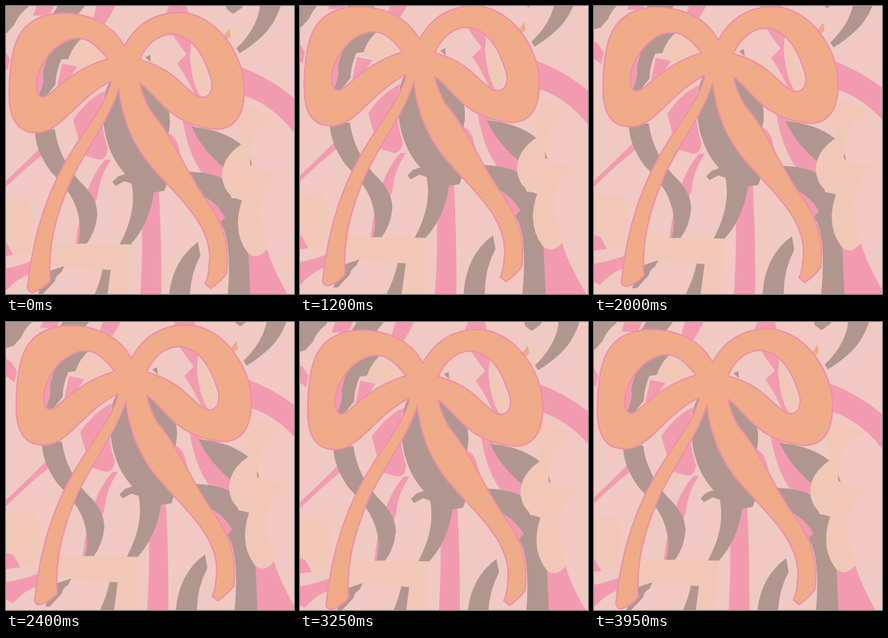
Recreate the animation shown at these times as an HTML page with a canvas. Size 360 px wide and 360 px high, loop 4 s.

```html
<!DOCTYPE html>
<html lang="en">
<head>
<meta charset="utf-8">
<title>Drifting bow</title>
<style>
  html, body { margin: 0; width: 100%; height: 100%; overflow: hidden; background: #f0c9c2; }
  canvas { display: block; width: 360px; height: 360px; }
</style>
</head>
<body>
<canvas id="stage" width="360" height="360"></canvas>
<script>
const ctx = document.getElementById('stage').getContext('2d');
const LOOP = 4000, STEP = 50, RADIUS = 5.2;
const BASE = '#f0c9c2', PINK = '#f29bb0', DARK = '#b19690', PEACH = '#f1c8b8',
      ORANGE = '#efab88', EDGE = '#f08ea8';

const shape = (color, ...paths) => ({ color, path: new Path2D(paths.join(' ')) });

const ribbons = [
  shape(PEACH, 'M84 40 L130 62 L100 82 L76 66Z'),
  shape(PINK,
    // top edge
    'M34 12 L42 -12 H66 L54 12Z',
    'M108 18 L117 -12 H141 Q134 8 124 22Z',
    'M200 10 L208 -12 H224 L229 16Z',
    'M-12 48 L-2 55 L5 66 L2 80 L-12 70Z',
    // inside the loops
    'M36 110 Q34 82 46 66 L56 62 L50 112Z',
    'M70 72 L89 76 L78 92 L64 100Z',
    'M204 28 L232 34 L230 62 Q230 84 246 116 L236 112 Q228 92 214 72 L226 60 Q214 46 204 28Z',
    // right band
    'M290 75 Q338 92 374 128 V178 Q338 121 290 110Z',
    // centre left
    'M84 142 Q102 116 124 106 Q114 138 127 178 Q126 192 116 192 L96 186Z',
    'M131 192 Q116 214 114 240 Q102 265 96 298 H87 Q95 224 124 192Z',
    'M-12 230 Q20 200 42 178 L47 185 Q20 206 -8 234Z',
    // centre right
    'M198 158 Q213 159 217 182 L224 206 L200 180Z',
    'M221 144 L236 150 Q243 179 273 200 L272 216 L246 210 Q228 186 221 144Z',
    'M248 236 L262 240 L277 266 L270 280Z',
    // bottom
    'M184 228 L191 230 Q195 300 194 374 H167 Q172 300 169 262Z',
    'M-12 292 L1 296 L9 311 L-12 314Z',
    'M-12 330 Q12 327 34 318 L32 334 Q14 340 0 356 L-12 350Z',
    'M303 304 L325 299 Q332 328 360 374 H304Z'),
  shape(DARK,
    // top edge
    'M-12 -12 H34 L27 2 Q16 10 10 24 L1 34 L-12 38Z',
    'M53 14 Q65 6 68 -12 H105 Q96 6 85 15Z',
    'M271 -12 H303 L295 2 L284 10 L276 4Z',
    'M318 -12 H347 Q339 20 321 37 Q306 51 292 59 L288 53 Q312 30 317 4Z',
    // left ribbon
    'M44 60 L66 36 L98 38 Q84 48 78 66 L69 67 Q62 84 62 98 L46 118 L41 112 Q49 94 46 84 L51 66Z',
    'M36 154 H61 Q66 190 92 219 Q115 240 114 262 Q112 282 101 297 H90 Q97 272 85 245 Q77 228 56 207 Q36 180 36 154Z',
    // centre crescent
    'M131 92 Q118 112 122 148 Q127 186 149 210 L140 213 L133 220 L137 225 L148 219 L157 222 Q164 258 142 298 L154 300 Q179 274 185 233 L198 231 L204 214 L190 172 L196 160 L203 160 Q208 140 200 119 L178 104 L162 76Z',
    'M174 64 L180 61 L181 70Z',
    // right ribbon
    'M232 151 Q270 154 294 173 L286 194 L272 202 Q244 178 232 151Z',
    'M228 207 Q258 208 273 217 L282 240 L296 242 Q287 276 303 307 L306 374 H276 Q284 298 268 270 L274 264 Q260 240 236 234Z',
    'M240 295 Q204 321 203 374 H230 Q228 340 243 312Z',
    // lower left
    'M52 332 L73 325 L69 333 Q62 337 61 344 L46 360 L40 360Z',
    'M118 327 L132 322 L126 374 H104 Q117 350 121 328Z'),
  shape(PEACH,
    'M-12 245 L28 243 L35 265 L30 308 L10 309 L3 296 L-12 292Z',
    'M58 297 L155 298 L151 374 H125 L131 330 L55 324Z',
    'M232 52 Q247 70 256 104 L243 113 Q228 88 232 52Z',
    'M297 123 L338 138 Q313 151 309 168 Q301 184 311 203 L343 208 Q318 225 317 256 Q319 281 328 302 Q314 320 302 308 Q282 282 295 243 Q273 238 270 214 Q269 190 294 173 Q296 157 289 153Z'),
  shape(DARK, 'M305 190 L308 200 L305 198Z'),
  shape(ORANGE, 'M271 39 L279 28 L281 38 L275 43Z')
];

const bow = new Path2D(
  'M148 50 C133 22 103 9 70 9 C14 11 4 50 4 112 C4 140 14 157 34 158 C68 162 84 118 131 94 ' +
  'L131 97 C124 122 104 148 87 174 C62 212 35 270 27 352 Q28 358 34 358 Q46 354 55 344 ' +
  'C52 300 62 262 82 216 C102 176 130 140 141 103 ' +
  'C144 130 152 160 172 188 C198 226 262 268 254 324 Q253 340 249 347 L256 353 Q268 345 276 334 ' +
  'C280 295 270 270 250 242 C225 208 210 165 180 130 Q170 112 167 96 ' +
  'C187 108 203 150 262 154 C288 154 298 135 298 103 C297 60 262 8 215 8 C185 9 163 22 148 50Z ' +
  'M127 66 C112 47 100 38 84 41 C60 46 38 75 38 100 C39 117 47 117 58 107 C80 87 100 74 127 66Z ' +
  'M167 67 C176 46 192 35 208 35 C238 38 250 70 257 93 C260 112 248 119 236 111 C218 98 208 78 167 67Z');

// The whole picture rides a small circle.
function drift(t) {
  const a = 2 * Math.PI * t / LOOP, q = Math.PI / 4;
  return [RADIUS * (Math.cos(q) - Math.cos(a - q)),
          RADIUS * (Math.cos(a + q) - Math.cos(q))];
}

function draw(t) {
  const [dx, dy] = drift(t);
  ctx.setTransform(1, 0, 0, 1, 0, 0);
  ctx.fillStyle = BASE;
  ctx.fillRect(0, 0, 360, 360);
  ctx.translate(dx, dy);
  for (const { color, path } of ribbons) {
    ctx.fillStyle = color;
    ctx.fill(path);
  }
  ctx.fillStyle = ORANGE;
  ctx.fill(bow, 'evenodd');
  ctx.strokeStyle = EDGE;
  ctx.lineWidth = 1.8;
  ctx.lineJoin = 'round';
  ctx.stroke(bow);
}

const start = performance.now();
function tick(now) {
  const t = Math.max(0, now - start) % LOOP;
  draw(Math.floor(t / STEP) * STEP);
  requestAnimationFrame(tick);
}
draw(0);
requestAnimationFrame(tick);
</script>
</body>
</html>
```
